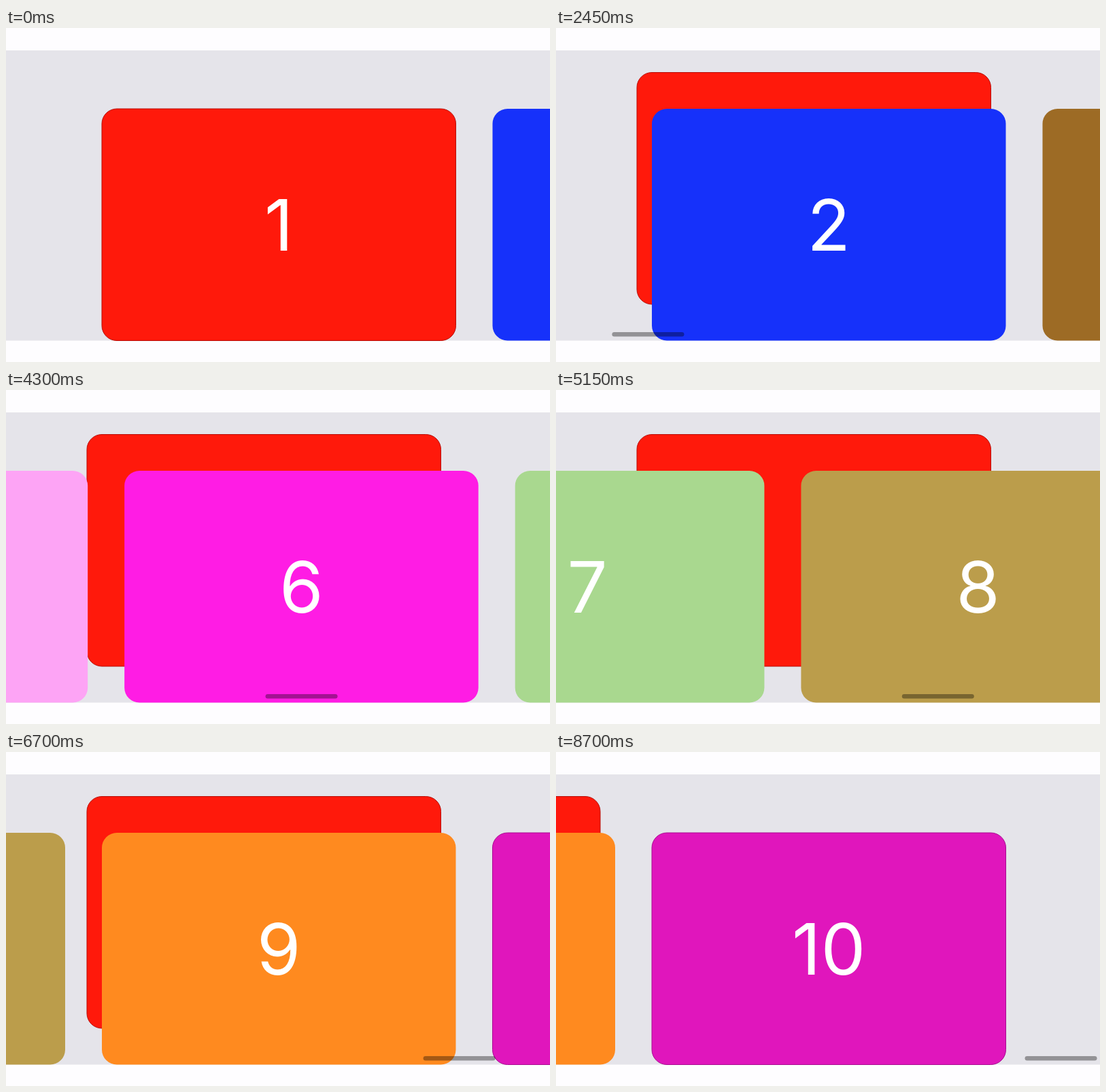
Recreate the animation shown at these times as an HTML page. Size 800 by 492 pixels, loop 8750 ms.

```html
<!DOCTYPE html>
<html lang="en">
<head>
<meta charset="utf-8">
<title>Sticky card carousel</title>
<style>
  html, body { margin: 0; width: 100%; height: 100%; overflow: hidden; background: #fefdff; }
  svg { display: block; width: 100%; height: 100%; }
  text { font: 400 104.5px Inter, "Liberation Sans", sans-serif; fill: #fff; text-anchor: middle; }
</style>
</head>
<body>
<svg id="stage" viewBox="0 0 800 492">
  <rect y="33" width="800" height="427.5" fill="#e5e4ea"/>
</svg>
<script>
const LOOP = 8750;
const PITCH = 574.5;
const CARD = { x: 141, y: 119, w: 520.5, h: 341.5, r: 22 };
const COLORS = ['#ff190b', '#1631fa', '#9d6b25', '#24bf92', '#fda4f5',
                '#ff1ce4', '#a9d88f', '#bb9d4b', '#ff8a1f', '#e016bc'];
const DARK_EDGE = { 0: '#b80c06', 9: '#a80c90' };
const SWIPE_START = 1420;
const PINNED_UNTIL = 8 * PITCH;

// Scroll offset over time: [ms, px]
const KEYS = [
  [0, 0], [SWIPE_START, 0], [1600, 125], [1800, 403], [2000, 530], [2250, PITCH],
  [2450, PITCH], [2650, 700], [2800, 920], [3000, 1100], [3200, 1146.5], [3300, 1149],
  [3400, 1175], [3600, 1600], [3850, 2300], [4050, 2660], [4300, 2839], [4450, 2870],
  [4600, 2900], [4850, 3290], [5150, 3800.5], [5450, 4250], [5800, 4500], [6200, 4585],
  [6500, PINNED_UNTIL], [7300, PINNED_UNTIL], [7500, 4700], [7700, 4920], [7900, 5070],
  [8100, 5135], [8400, 5168], [8600, 9 * PITCH], [LOOP, 9 * PITCH]
];

const stage = document.getElementById('stage');
const clamp = (v, lo, hi) => Math.min(hi, Math.max(lo, v));

function add(parent, tag, attrs) {
  const el = document.createElementNS('http://www.w3.org/2000/svg', tag);
  for (const name in attrs) el.setAttribute(name, attrs[name]);
  return parent.appendChild(el);
}

const cards = COLORS.map((fill, i) => {
  const g = add(stage, 'g', {});
  add(g, 'rect', { width: CARD.w, height: CARD.h, rx: CARD.r, fill, stroke: DARK_EDGE[i] || 'none' });
  add(g, 'text', { x: CARD.w / 2, y: 209 }).textContent = i + 1;
  return g;
});
const bar = add(stage, 'rect', { y: 448, width: 106, height: 6.5, rx: 3.25, fill: '#000' });

const slope = i => (KEYS[i + 1][1] - KEYS[i][1]) / (KEYS[i + 1][0] - KEYS[i][0]);

// Harmonic mean of neighbouring slopes keeps the curve monotone
function tangent(i) {
  if (i === 0 || i === KEYS.length - 1) return 0;
  const a = slope(i - 1), b = slope(i);
  return a * b > 0 ? 2 * a * b / (a + b) : 0;
}

function scrollAt(t) {
  const i = KEYS.findIndex((key, n) => n && t <= key[0]) - 1;
  const [t0, s0] = KEYS[i], [t1, s1] = KEYS[i + 1];
  const d = t1 - t0, u = (t - t0) / d, v = 1 - u;
  return s0 * v * v * (1 + 2 * u) + s1 * u * u * (3 - 2 * u)
    + d * u * v * (tangent(i) * v - tangent(i + 1) * u);
}

function render(t) {
  const scroll = scrollAt(t);
  const lift = clamp(scroll / CARD.w, 0, 1);
  cards.forEach((card, i) => {
    let x = CARD.x + i * PITCH - scroll, y = CARD.y;
    if (i === 0) {
      x = CARD.x - 22 * lift - Math.max(0, scroll - PINNED_UNTIL);
      y -= 53.5 * lift;
    }
    card.setAttribute('transform', `translate(${x} ${y})`);
  });
  bar.setAttribute('x', 6.5 + scroll * 0.1321);
  bar.setAttribute('opacity', 0.36 * clamp((t - SWIPE_START) / 100, 0, 1));
}

const start = performance.now();
function tick() {
  render((performance.now() - start) % LOOP);
  requestAnimationFrame(tick);
}
tick();
</script>
</body>
</html>
```
